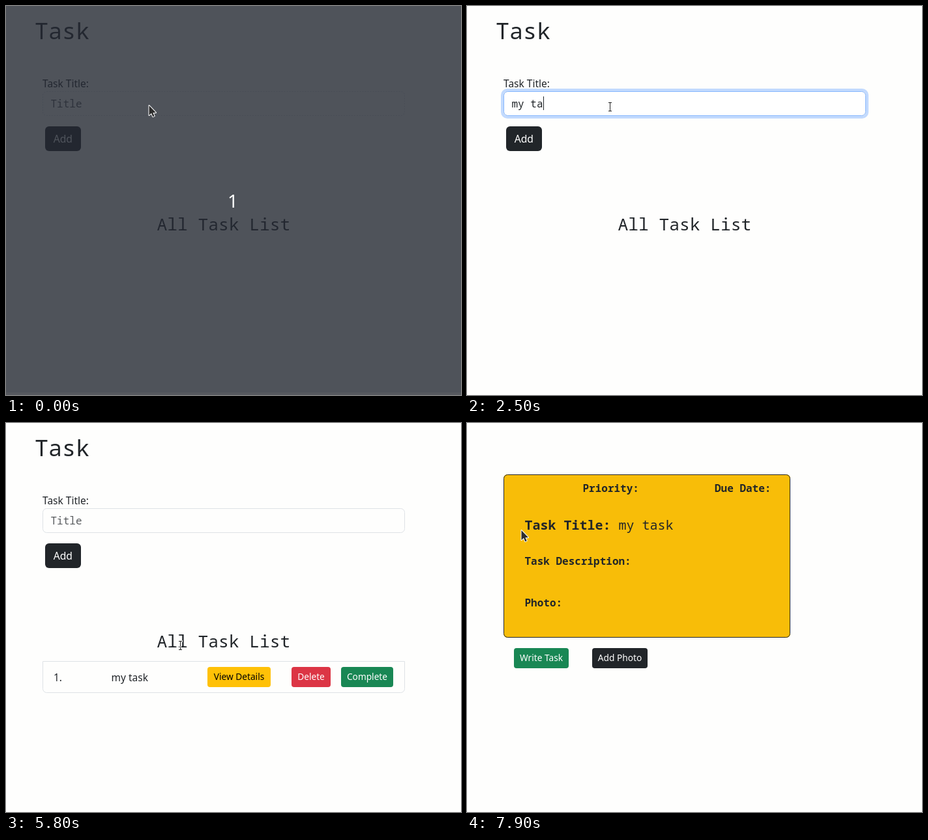
Animation of 698x598 px, one loop 8000 ms. Source, as an HTML page with a canvas:

```html
<!DOCTYPE html>
<html lang="en">
<head>
<meta charset="utf-8">
<title>Task list</title>
<style>
  html, body { margin: 0; width: 100%; height: 100%; overflow: hidden; background: #fefefd; }
  canvas { display: block; }
</style>
</head>
<body>
<canvas id="stage" width="698" height="598"></canvas>
<script>
const ctx = document.getElementById('stage').getContext('2d');
const W = 698, H = 598, LOOP = 8000, STEP = 100;
const PAGE = '#fefefd', INK = '#212529', LINE = '#dee2e6';
const GREEN = '#198754', RED = '#dc3545', YELLOW = '#ffc107';
const SANS = '"Noto Sans", "Open Sans", sans-serif';
const MONO = '"Noto Sans Mono", "DejaVu Sans Mono", monospace';

// When each letter of the task name is typed
const TYPED = 'my task';
const KEY_TIMES = [1500, 1800, 2100, 2300, 2500, 3100, 3300];

function text(str, x, y, size, { font = SANS, color = INK, weight = 400, align = 'left' } = {}) {
  ctx.font = `${weight} ${size}px ${font}`;
  ctx.fillStyle = color;
  ctx.textAlign = align;
  ctx.fillText(str, x, y);
}

function mono(str, x, y, size, options = {}) {
  text(str, x, y, size, { font: MONO, ...options });
}

function box(x, y, w, h, radius, fill, stroke) {
  ctx.beginPath();
  ctx.roundRect(x, y, w, h, radius);
  if (fill) {
    ctx.fillStyle = fill;
    ctx.fill();
  }
  if (stroke) {
    ctx.beginPath();
    ctx.roundRect(x + 0.5, y + 0.5, w - 1, h - 1, radius);
    ctx.strokeStyle = stroke;
    ctx.lineWidth = 1;
    ctx.stroke();
  }
}

function smallButton(label, x, y, w, fill, color = '#fff') {
  box(x, y, w, 31, 4, fill);
  text(label, x + w / 2, y + 20, 13.7, { color, align: 'center' });
}

function bezier(points, t) {
  const u = 1 - t;
  const k = [u * u * u, 3 * u * u * t, 3 * u * t * t, t * t * t];
  return [0, 1].map(axis => points.reduce((sum, p, i) => sum + p[axis] * k[i], 0));
}

// Pointers

function outlined(points, x, y) {
  ctx.beginPath();
  points.forEach(([px, py]) => ctx.lineTo(x + px, y + py));
  ctx.closePath();
  ctx.lineJoin = 'round';
  ctx.strokeStyle = '#fff';
  ctx.lineWidth = 2;
  ctx.stroke();
  ctx.fillStyle = '#2d2d2d';
  ctx.fill();
}

const ARROW = [[0.5, 1], [0.5, 16], [4, 12.8], [6.3, 18.2], [8.7, 17.2], [6.4, 12], [11, 12]];
const HAND = [[-1.5, 0], [1, 0], [1.5, 7], [8, 9], [9, 12], [7, 19], [-1, 19], [-5, 12], [-4, 10.5], [-1.5, 12]];

function beam(x, y) {
  const left = Math.round(x), top = Math.round(y) - 6;
  const shape = grow => {
    ctx.fillRect(left - 1 - grow, top - grow, 1 + 2 * grow, 13 + 2 * grow);
    for (const row of [top - 1, top + 12]) {
      ctx.fillRect(left - 3 - grow, row - grow, 5 + 2 * grow, 1 + 2 * grow);
    }
  };
  ctx.fillStyle = '#fff';
  shape(1);
  ctx.fillStyle = '#222';
  shape(0);
}

function pointer(t) {
  if (t < 100) return ['arrow', 219, 152];
  if (t < 5500) {
    if (t >= 4200 && t < 4400) return ['arrow', 219, 153];
    return ['beam', 220, t < 500 ? 154 : 155];
  }
  if (t < 6400) {
    const k = (t - 5400) / 900;
    const [x, y] = bezier([[220, 155], [225, 300], [320, 480], [365, 390]], k);
    if (overView(x, y)) return ['hand', x, y];
    const overText = y < 169 || (x > 232 && x < 436 && y > 320 && y < 352);
    return [overText ? 'beam' : 'arrow', x, y];
  }
  if (t < 6800) return ['hand', 361, 390];
  if (t < 7400) return ['arrow', 361, 390];
  const [x, y] = bezier([[361, 390], [690, 100], [250, -60], [83, 164]], Math.min(1, (t - 7300) / 600));
  return ['arrow', x, y];
}

function drawPointer([kind, x, y]) {
  if (kind === 'beam') beam(x, y);
  else outlined(kind === 'hand' ? HAND : ARROW, x, y);
}

function overView(x, y) {
  return x >= 309 && x < 406 && y >= 375 && y < 406;
}

// Pages

function field(t) {
  const focus = t < 400 || t >= 4400 ? 0 : Math.min(1, (t - 300) / 400);
  const typed = t < 4400 ? TYPED.slice(0, KEY_TIMES.filter(k => t >= k).length) : '';

  if (t < 100) ctx.setLineDash([2, 2]);
  if (focus) {
    box(52, 127, 564, 46, 10, `rgba(13,110,253,${0.25 * focus})`);
    box(56, 131, 556, 38, 6, '#fff', LINE);
    ctx.globalAlpha = focus;
    box(56, 131, 556, 38, 6, null, '#86b7fe');
    ctx.globalAlpha = 1;
  } else {
    box(56, 131, 556, 38, 6, null, LINE);
  }
  ctx.setLineDash([]);

  if (typed) mono(typed, 68.5, 156, 16);
  else mono('Title', 68.5, 156, 16, { color: '#595c5f' });

  const caret = (t >= 400 && t < 1000) || (t >= 1500 && t < 4000);
  if (caret) {
    ctx.fillStyle = INK;
    ctx.fillRect(Math.floor(69 + typed.length * 9.6), 139, 1, 21);
  }
}

function tooltip(alpha) {
  ctx.save();
  ctx.globalAlpha = alpha;
  ctx.shadowColor = 'rgba(0,0,0,.4)';
  ctx.shadowBlur = 12;
  ctx.shadowOffsetY = 2;
  box(231, 171, 173, 24, 0, '#28292a');
  ctx.shadowColor = 'transparent';
  text('Please fill out this field.', 317.5, 188, 14.6, { color: '#d3d3d2', align: 'center' });
  ctx.restore();
}

function taskRow(hover) {
  box(56, 366, 556, 49, [0, 0, 6, 6], null, LINE);
  text('1.', 73, 397, 15.5);
  text(TYPED, 161.5, 397, 15.5);
  smallButton('View Details', 309, 375, 97, hover ? '#ffca2c' : YELLOW, '#000');
  smallButton('Delete', 438, 375, 60, RED);
  smallButton('Complete', 514, 375, 80, GREEN);
}

function listPage(t, cursor) {
  mono('Task', 44, 51, 35);
  text('Task Title:', 56, 125, 15.5);
  field(t);
  box(60, 185, 55, 38, 6, INK);
  text('Add', 87.3, 210, 15.7, { color: '#fff', align: 'center' });
  mono('All Task List', 231.5, 345, 26.25);
  if (t >= 4400) taskRow(overView(cursor[1], cursor[2]));
  if (t >= 1200 && t < 1500) tooltip(t < 1300 ? 0.5 : 1);
}

function detailPage() {
  const bold = { weight: 700 };
  box(56, 79, 440, 251, 6, '#f8bd08', INK);
  mono('Priority:', 177.5, 106, 16, bold);
  mono('Due Date:', 380, 106, 16, bold);
  mono('Task Title:', 88.5, 164, 20, bold);
  mono(TYPED, 232.5, 164, 20);
  mono('Task Description:', 88.5, 218, 16, bold);
  mono('Photo:', 88.5, 282, 16, bold);
  smallButton('Write Task', 72, 346, 84, GREEN);
  smallButton('Add Photo', 192, 346, 85, INK);
}

function countdown() {
  ctx.fillStyle = 'rgba(36,41,50,.8)';
  ctx.fillRect(0, 0, W, H);
  ctx.fillStyle = '#56595f';
  ctx.fillRect(0, 594, W, 4);
  text('1', 348, 310, 28, { color: '#fff', weight: 500, align: 'center' });
}

function draw(t) {
  const cursor = pointer(t);
  ctx.fillStyle = PAGE;
  ctx.fillRect(0, 0, W, H);
  if (t < 7000) listPage(t, cursor);
  else detailPage();
  if (t < 100) countdown();
  drawPointer(cursor);
}

const start = performance.now();
function tick() {
  const t = (performance.now() - start) % LOOP;
  draw(Math.floor(t / STEP) * STEP);
  requestAnimationFrame(tick);
}
tick();
</script>
</body>
</html>
```
